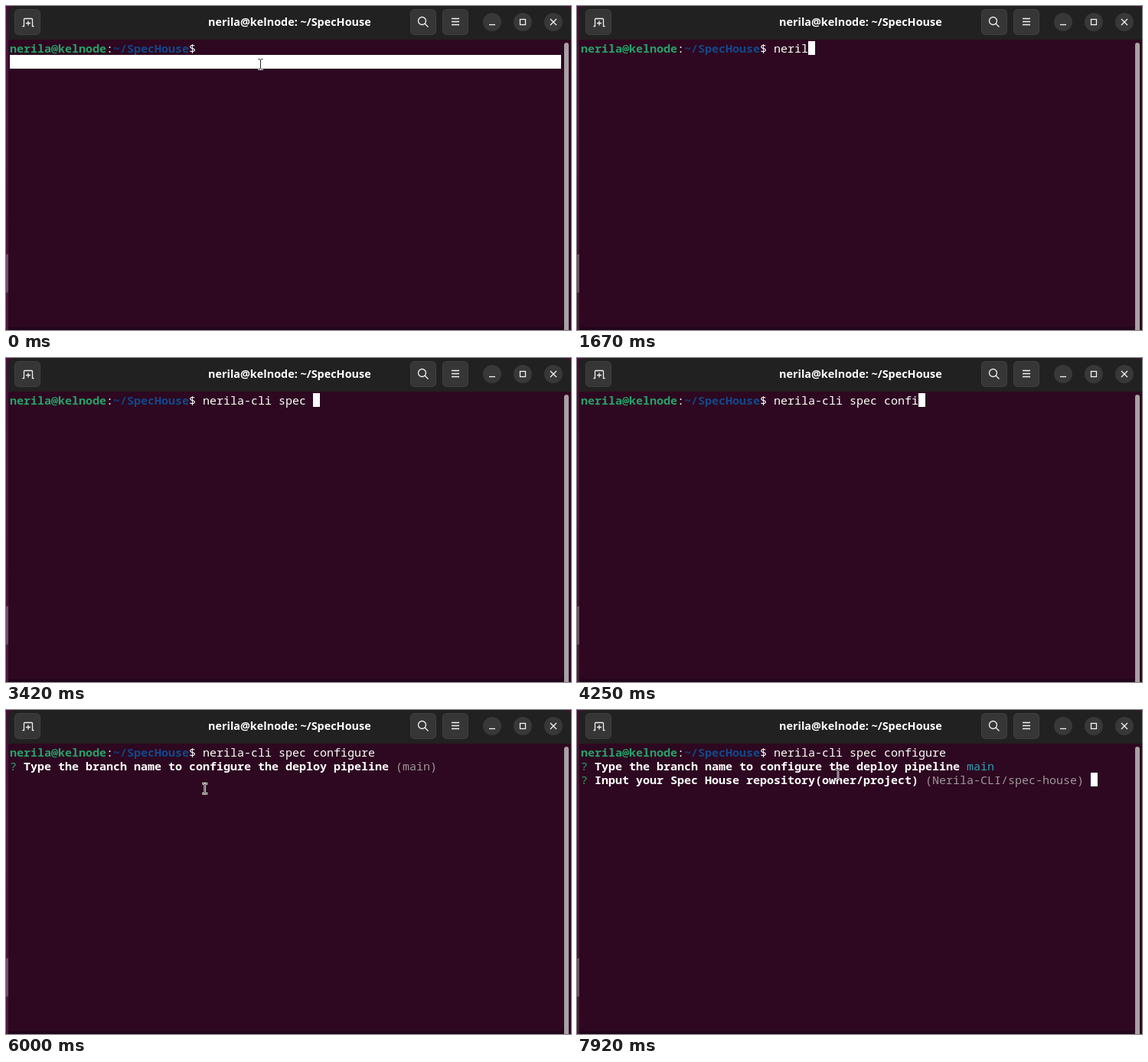
An HTML page that plays this animation: 738 by 424 pixels, repeating every 8000 ms.

```html
<!DOCTYPE html>
<html lang="en">
<head>
<meta charset="utf-8">
<title>Terminal session</title>
<style>
  html, body { margin: 0; width: 100%; height: 100%; overflow: hidden; background: #2d0820; }
  svg { display: block; width: 100%; height: 100%; }
  text { white-space: pre; }
  .title { font: bold 14.4px "Noto Sans", sans-serif; fill: #fff; }
  #terminal text { font: 15px "Noto Sans Mono", monospace; fill: #fff; }
  #terminal .bold { font-weight: bold; }
  #terminal .green { fill: #26a269; }
  #terminal .blue { fill: #12488b; }
  #terminal .cyan { fill: #2aa1b3; }
  #terminal .dim { fill: #a0969c; }
  .button { fill: #363636; stroke: #404040; }
  .round { fill: #383838; }
  .icon { fill: none; stroke: #f2f2f2; stroke-width: 1.3; }
</style>
</head>
<body>
<svg viewBox="0 0 738 424">
  <defs>
    <linearGradient id="wallpaper" x2="0" y2="1">
      <stop offset="0" stop-color="#431035"/>
      <stop offset=".35" stop-color="#541640"/>
      <stop offset=".68" stop-color="#4b1039"/>
      <stop offset="1" stop-color="#4d1c3c"/>
    </linearGradient>
  </defs>

  <rect width="738" height="424" fill="url(#wallpaper)"/>
  <rect y="325" width="4" height="50" fill="#734a68"/>
  <path d="M3 424V10Q3 0 13 0H728Q738 0 738 10V424Z" fill="#2d0820"/>
  <path d="M3 44V10Q3 0 13 0H728Q738 0 738 10V44Z" fill="#212121"/>
  <rect x="3" y="420.5" width="725" height="3.5" fill="#20051a"/>
  <path d="M729 424V51a3 3 0 0 1 6 0V424Z" fill="#a7a1a5"/>

  <rect class="button" x="11.5" y="4.5" width="33" height="33" rx="5"/>
  <rect class="button" x="528.5" y="4.5" width="33" height="33" rx="5"/>
  <rect class="button" x="570.5" y="4.5" width="33" height="33" rx="5"/>
  <circle class="round" cx="635" cy="21" r="12"/>
  <circle class="round" cx="675" cy="21" r="12"/>
  <circle class="round" cx="715" cy="21" r="12"/>
  <g class="icon">
    <path d="M21.5 26.5h2v-9q0-1 1-1h9q1 0 1 1v9h2M29 19.5v6M26 22.5h6"/>
    <circle cx="543.5" cy="19.5" r="5"/>
    <path d="M547 23l4.5 4.5"/>
    <path d="M582 16.5h10M582 20.5h10M582 24.5h10"/>
    <path d="M631 24.5h8"/>
    <rect x="671.5" y="17.5" width="7" height="7"/>
    <path d="M711 17l8 8M719 17l-8 8"/>
  </g>
  <text class="title" x="264" y="26">nerila@kelnode: ~/SpecHouse</text>

  <g id="terminal">
    <rect id="band" x="5" y="64" width="720" height="18" fill="#fff"/>
    <rect id="block" width="9" height="18" fill="#fff"/>
  </g>
  <g id="pointer" fill="none">
    <path d="M-3.5-6.5h2.5l1 1 1-1h2.5M0-6V6M-3.5 6.5h2.5l1-1 1 1h2.5" stroke="#fff" stroke-width="2.6"/>
    <path d="M-3-6.5h2l1 1 1-1h2M0-6V6M-3 6.5h2l1-1 1 1h2" stroke="#222"/>
  </g>
</svg>
<script>
const LOOP = 8000, CELL = 9, ROW = 18, LEFT = 5, TOP = 46, PROMPT = 28;
const COMMAND = "nerila-cli spec configure";
const byId = id => document.getElementById(id);
const terminal = byId("terminal"), band = byId("band"), block = byId("block"), pointer = byId("pointer");

function write(row, col, content, style = "") {
  const node = document.createElementNS("http://www.w3.org/2000/svg", "text");
  node.setAttribute("x", LEFT + col * CELL);
  node.setAttribute("y", TOP + row * ROW + 15);
  node.setAttribute("class", style);
  node.textContent = content;
  terminal.append(node);
  return node;
}

function show(node, visible) {
  node.style.display = visible ? "" : "none";
}

write(0, 0, "nerila@kelnode", "bold green");
write(0, 14, ":");
write(0, 15, "~/SpecHouse", "bold blue");
write(0, 26, "$");
const command = write(0, PROMPT, "");
const branchQuestion = [
  write(1, 0, "?", "green"),
  write(1, 2, "Type the branch name to configure the deploy pipeline", "bold")
];
const branchDefault = write(1, 56, "(main)", "dim");
const branchAnswer = write(1, 56, "main", "cyan");
const repoQuestion = [
  write(2, 0, "?", "green"),
  write(2, 2, "Input your Spec House repository(owner/project)", "bold"),
  write(2, 50, "(Nerila-CLI/spec-house)", "dim")
];

// Moment at which each character of the command appears.
const keyTimes = [
  1000, 1170, 1330, 1500, 1580, 1750, 2080, 2250, 2420, 2500, 2670, 2830, 2920,
  3080, 3250, 3420, 3580, 3670, 3830, 4080, 4250, 4670, 4670, 4830, 4830
];
const ENTER = 5000, ASK_BRANCH = 5830, ANSWER = 7420, ASK_REPO = 7580;

const blinkOff = [[0, 80], [4580, 4830], [5580, 6170], [6750, ASK_REPO]];
const within = (t, [from, to]) => t >= from && t < to;

// Pointer stops as [time, x, y]; it is hidden between the two trips.
const trips = [
  [[0, 332.5, 76], [420, 332.5, 76], [750, 335, 77], [1000, 335, 77]],
  [[6000, 260, 103], [6170, 223, 88], [6420, 223, 88], [6750, 340, 87],
   [7420, 340, 87], [7670, 341, 84], [LOOP, 341, 84]]
];

function pointerAt(t) {
  const trip = trips.find(stops => within(t, [stops[0][0], stops.at(-1)[0]]));
  if (!trip) return null;
  const i = trip.findIndex(stop => stop[0] > t);
  const [t0, x0, y0] = trip[i - 1], [t1, x1, y1] = trip[i];
  const k = (t - t0) / (t1 - t0);
  return [x0 + (x1 - x0) * k, y0 + (y1 - y0) * k];
}

function cursorCell(t, typed) {
  if (t >= ASK_REPO) return [2, 74];
  if (t >= ASK_BRANCH) return [1, 63];
  if (t >= ENTER) return [1, 0];
  return [0, PROMPT + typed];
}

function draw(t) {
  const typed = keyTimes.filter(time => time <= t).length;
  command.textContent = COMMAND.slice(0, typed);
  show(band, t < 80);
  branchQuestion.forEach(node => show(node, t >= ASK_BRANCH));
  show(branchDefault, within(t, [ASK_BRANCH, ANSWER]));
  show(branchAnswer, t >= ANSWER);
  repoQuestion.forEach(node => show(node, t >= ASK_REPO));

  const [row, col] = cursorCell(t, typed);
  block.setAttribute("x", LEFT + col * CELL);
  block.setAttribute("y", TOP + row * ROW);
  show(block, !blinkOff.some(span => within(t, span)));

  const place = pointerAt(t);
  show(pointer, place);
  if (place) pointer.setAttribute("transform", `translate(${place})`);
}

const start = performance.now();
function tick() {
  draw((performance.now() - start) % LOOP);
  requestAnimationFrame(tick);
}
tick();
</script>
</body>
</html>
```
